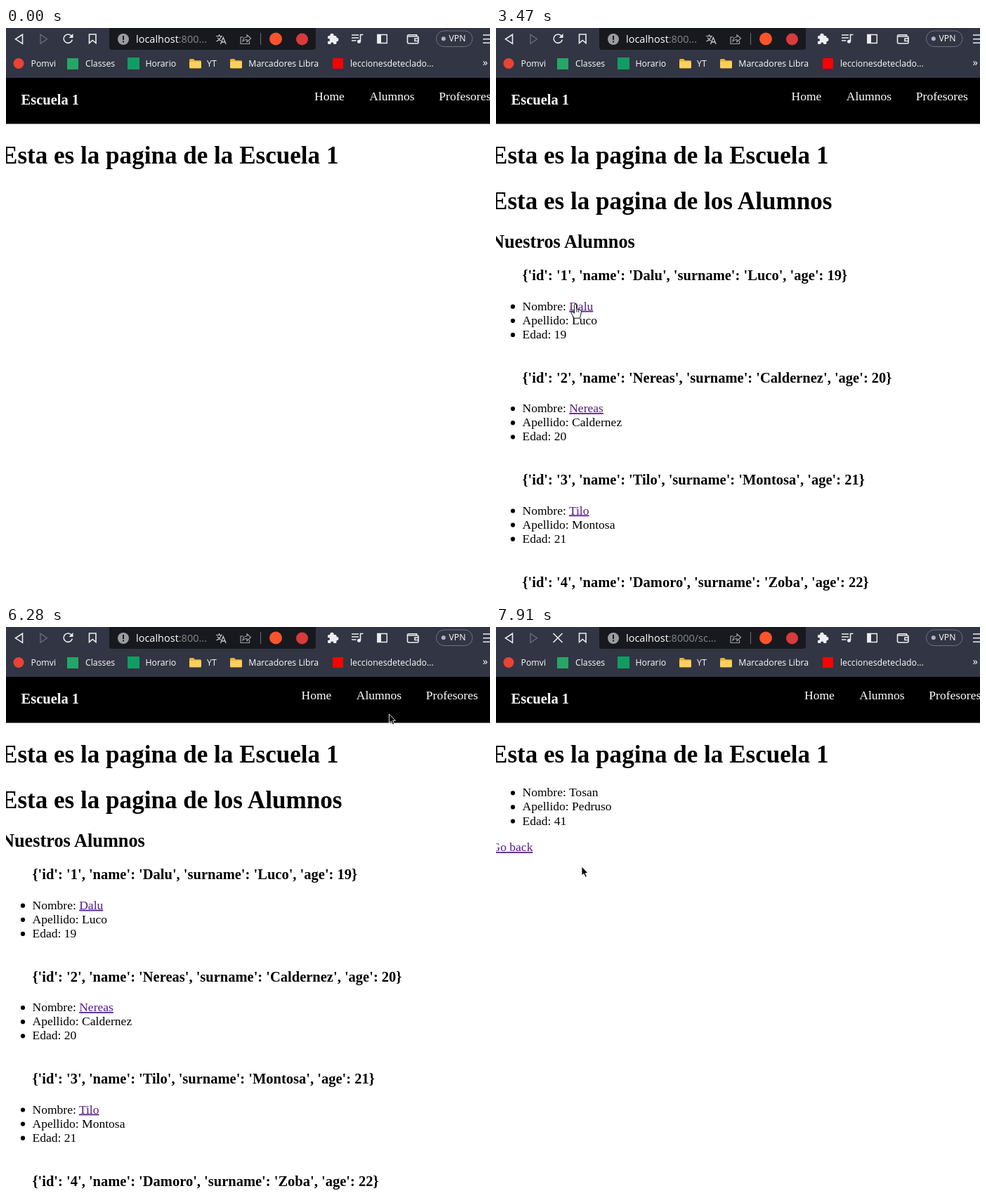
An HTML page that plays this animation: 689 by 813 pixels, repeating every 8000 ms.

```html
<!DOCTYPE html>
<html lang="es">
<head>
<meta charset="utf-8">
<title>Escuela 1</title>
<style>
html, body { margin: 0; width: 100%; height: 100%; overflow: hidden; background: #fff; }
svg { display: block; width: 689px; height: 813px; }
.serif { font-family: "Liberation Serif", "Times New Roman", serif; font-size: 17.55px; }
.sans { font-family: "Open Sans", "Noto Sans", sans-serif; font-size: 12.3px; fill: #fff; }
.h1 { font-size: 35.1px; font-weight: bold; }
.h2 { font-size: 26.3px; font-weight: bold; }
.h3 { font-size: 20.5px; font-weight: bold; }
.link { fill: #551a8b; text-decoration: underline; }
.line { fill: none; stroke: #eceef2; stroke-width: 1.6; }
</style>
</head>
<body>
<svg id="stage" viewBox="0 0 689 813" xmlns="http://www.w3.org/2000/svg"></svg>
<script>
const LOOP = 8000;
const students = [
  ["Dalu", "Luco", 19], ["Nereas", "Caldernez", 20],
  ["Tilo", "Montosa", 21], ["Damoro", "Zoba", 22]
];
const teachers = [["Tosan", "Pedruso", 41], ["Varelio", "Gondera", 38], ["Belmo", "Astuy", 45]];

const text = (x, y, s, cls = "", attrs = "") => `<text x="${x}" y="${y}" class="${cls}" ${attrs}>${s}</text>`;
const rect = (x, y, w, h, fill, r = 0) => `<rect x="${x}" y="${y}" width="${w}" height="${h}" rx="${r}" fill="${fill}"/>`;
const dot = (x, y, r, fill) => `<circle cx="${x}" cy="${y}" r="${r}" fill="${fill}"/>`;
const line = (d, attrs = "") => `<path d="${d}" class="line" ${attrs}/>`;
const shape = (d, fill) => `<path d="${d}" fill="${fill}"/>`;
const group = (id, body, attrs = "") => `<g id="${id}" ${attrs}>${body}</g>`;

function personRows([name, surname, age], y, linked) {
  const label = linked ? `<tspan class="link">${name}</tspan>` : name;
  return [`Nombre: ${label}`, `Apellido: ${surname}`, `Edad: ${age}`]
    .map((row, i) => dot(24, y - 5 + i * 20.1, 3.1, "#000") + text(37.5, y + i * 20.1, row))
    .join("");
}

function personList(people, top) {
  return people.map((p, i) => {
    const y = top + i * 145.4;
    const head = `{'id': '${i + 1}', 'name': '${p[0]}', 'surname': '${p[1]}', 'age': ${p[2]}}`;
    return text(37.5, y, head, "h3") + personRows(p, y + 42.4, true);
  }).join("");
}

const detail = p => personRows(p, 241.3, false) + text(-6.5, 319.2, "Go back", "link");

function folder(x) {
  return shape(`M${x} 45.5q0-1.5 1.5-1.5h4.5l2 2.2h7.5q1.5 0 1.5 1.5v8q0 1.5-1.5 1.5h-14q-1.500 0-1.500-1.500z`, "#e8b33c")
    + rect(x, 47.8, 17, 9.4, "#fbd15b", 1.3);
}

function toolbar() {
  const stop = line("M81.500 9l13 13M94.500 9l-13 13");
  const reload = line("M93.2 11.3A6.200 6.200 0 1 0 94.300 16.800") + shape("M95.500 8v6h-6z", "#eceef2");
  const translate = line("M299 11.500h9M303.500 9v2.500M306.500 11.500q-1.500 5-7 7.500M301 13.500q2 3.500 5 4.700", 'style="stroke-width:1.200;stroke:#c5c7cd"')
    + line("M305.500 23l3.800-9.500 3.800 9.500M306.800 20h5", 'style="stroke-width:1.300;stroke:#c5c7cd"');
  return rect(0, 0, 689, 71, "#323543")
    + rect(147, -5, 294, 36, "#17191f", 4)
    + line("M23.500 9.300v13L13.500 15.800z")
    + line("M49 9.300v13l9.500-6.500z", 'style="stroke:#6d707c;stroke-width:1.300"')
    + group("stop", stop) + group("reload", reload)
    + line("M118.500 9h9.500v12.500l-4.750-4-4.750 4z")
    + dot(167, 16, 8, "#9a9ca3") + rect(166, 11, 2, 6, "#17191f") + rect(166, 18.5, 2, 2, "#17191f")
    + `<text x="185" y="21" class="sans" style="font-size:14.5px">localhost<tspan id="path" fill="#868991"></tspan></text>`
    + group("translate", translate)
    + line("M338 13h-4v9.500h12.500v-4M337 19q.5-6 6-6v-3.200l5.500 5-5.500 5v-3.300q-4 0-6 2.500z", 'style="stroke:#9ea1a8;stroke-width:1.200"')
    + rect(362, 7, 1, 17, "#6f727a")
    + dot(384, 15.5, 9, "#fb542b") + dot(421.5, 16, 8.5, "#d93a3c")
    + rect(458, 11, 12.5, 12, "#eceef2", 1.5) + dot(464, 10.5, 2.7, "#eceef2")
    + dot(470.7, 16.5, 2.7, "#eceef2") + dot(459, 17, 2, "#323543") + dot(464.3, 22.5, 2, "#323543")
    + line("M492 10h10M492 14h10M492 18h6.500M504.500 19V9.500h4")
    + dot(502.5, 19.3, 2.5, "#eceef2")
    + line("M528.800 9.500h13.500v12h-13.500z", 'style="stroke-width:1.400"') + rect(529, 10, 5, 11, "#eceef2")
    + line("M584.500 12v-2.300h-11q-2 0-2 2v8.300q0 2 2 2h12q1.500 0 1.500-1.500v-7q0-1.500-1.500-1.500h-13M587 15h-5v3.500h5")
    + `<rect x="612.5" y="4" width="51.5" height="22.500" rx="11.2" fill="none" stroke="#70737f"/>`
    + dot(622.8, 15.3, 3, "#aeb3c5") + text(630.5, 19.4, "VPN", "sans")
    + line("M679 10h12M679 15.700h12M679 21.300h12")
    + dot(18, 50.5, 7.5, "#ea4335") + text(35.5, 55, "Pomvi", "sans")
    + rect(87, 43, 16, 16, "#25a667") + text(113, 55, "Classes", "sans")
    + rect(173, 42, 17, 17, "#109d63") + text(198.5, 55, "Horario", "sans")
    + folder(261) + text(286, 55, "YT", "sans")
    + folder(319) + text(345.3, 55, "Marcadores Libra", "sans")
    + rect(465, 43, 15, 15, "#ff0000") + text(490, 55, "leccionesdeteclado...", "sans")
    + text(678.5, 54, "»", "sans", 'style="font-size:15px"');
}

const links = text(439, 102.7, "Home") + text(517.3, 102.7, "Alumnos") + text(616.3, 102.7, "Profesores");
const pages = {
  home: "",
  students: text(-7, 258, "Esta es la pagina de los Alumnos", "h1")
    + text(-7, 313, "Nuestros Alumnos", "h2") + personList(students, 359.3),
  student: detail(students[0]),
  teachers: text(-7, 258, "Esta es la pagina de los Profesores", "h1") + personList(teachers, 301),
  teacher: detail(teachers[0])
};

document.getElementById("stage").innerHTML =
  rect(0, 0, 689, 813, "#fff") + toolbar()
  + `<g class="serif">`
  + rect(0, 71, 689, 65.5, "#000")
  + text(21.5, 109.3, "Escuela 1", "h3", 'fill="#fff"')
  + group("nav", links, 'fill="#fff"')
  + text(-7, 193, "Esta es la pagina de la Escuela 1", "h1")
  + Object.keys(pages).map(k => group(k, pages[k])).join("")
  + `</g>`
  + group("arrow", `<path d="M0 0V13L3 10.300L5.200 15.300L7.300 14.400L5.200 9.500H9Z" fill="#000" stroke="#fff" stroke-width=".9"/>`)
  + group("hand", `<path d="M-1.600 1.500a1.600 1.600 0 0 1 3.200 0V7l5 1.200q2 .6 1.800 2.800L7.800 15l-1.300 5.200H-1.800L-5.800 13.200q-.8-2 .8-2.300 1.300 0 3.400 2.400ZM2 7.500v4M4.700 8.300v3.500" fill="#fff" stroke="#111" stroke-width="1"/>`);

const el = id => document.getElementById(id);
const show = (id, on) => { el(id).style.display = on ? "" : "none"; };

// click, page shown, loading finished
const visits = [
  [1870, 2360, 2560, "students"],
  [3810, 4010, 4150, "student"],
  [5310, 5380, 5510, "students"],
  [6560, 6970, 7180, "teachers"],
  [7840, 7910, 8100, "teacher"]
];

// time, x, y of the pointer's hot spot
const track = [
  [310, 634, 744], [520, 610, 490], [730, 566, 270], [900, 511, 120], [1070, 544, 82],
  [1140, 544, 84], [1410, 544, 98], [1870, 544, 98],
  [2290, 434, 143], [2630, 256, 225], [2700, 250, 232],
  [3100, 165, 335], [3470, 113, 393], [4480, 113, 393],
  [4830, 49, 327], [5040, 8, 308], [5240, 30, 305], [5720, 30, 305],
  [5930, 190, 262], [6280, 545, 124], [6490, 626, 87], [6830, 626, 87],
  [7100, 400, 210], [7360, 158, 344], [7570, 122, 341], [8000, 122, 341]
];

function pointer(t) {
  const i = track.findIndex(k => k[0] > t);
  const [t0, x0, y0] = track[i - 1], [t1, x1, y1] = track[i];
  const f = (t - t0) / (t1 - t0);
  return [x0 + (x1 - x0) * f, y0 + (y1 - y0) * f];
}

function overLink(page, x, y) {
  const inside = (l, r, top, bottom) => x >= l && x <= r && y >= top && y <= bottom;
  const shift = page === "students" ? 18.5 : 0;
  const navHit = [[439, 482], [517, 582], [616, 691]]
    .some(([l, r]) => inside(l - shift, r - shift, 78, 114));
  if (navHit) return true;
  if (page === "students") return inside(104, 138, 386, 406);
  if (page === "teachers") return inside(104, 148, 328, 348);
  return page !== "home" && inside(-7, 53, 304, 323);
}

function draw(t) {
  let page = "home", loading = false, fresh = false;
  for (const [click, commit, done, name] of visits) {
    if (t >= click) loading = t < done;
    if (t >= commit) { page = name; fresh = t < done; }
  }
  for (const name in pages) show(name, name === page);
  show("stop", loading);
  show("reload", !loading);
  show("translate", !fresh);
  el("path").textContent = fresh ? ":8000/sc..." : ":800...";
  el("nav").setAttribute("transform", `translate(${page === "students" ? -18.5 : 0} 0)`);

  const visible = t >= 310;
  const [x, y] = visible ? pointer(t) : [0, 0];
  const hand = overLink(page, x, y);
  show("hand", visible && hand);
  show("arrow", visible && !hand);
  el(hand ? "hand" : "arrow").setAttribute("transform", `translate(${x} ${y})`);
}

const start = performance.now();
function tick() {
  draw((performance.now() - start) % LOOP);
  requestAnimationFrame(tick);
}
tick();
</script>
</body>
</html>
```
